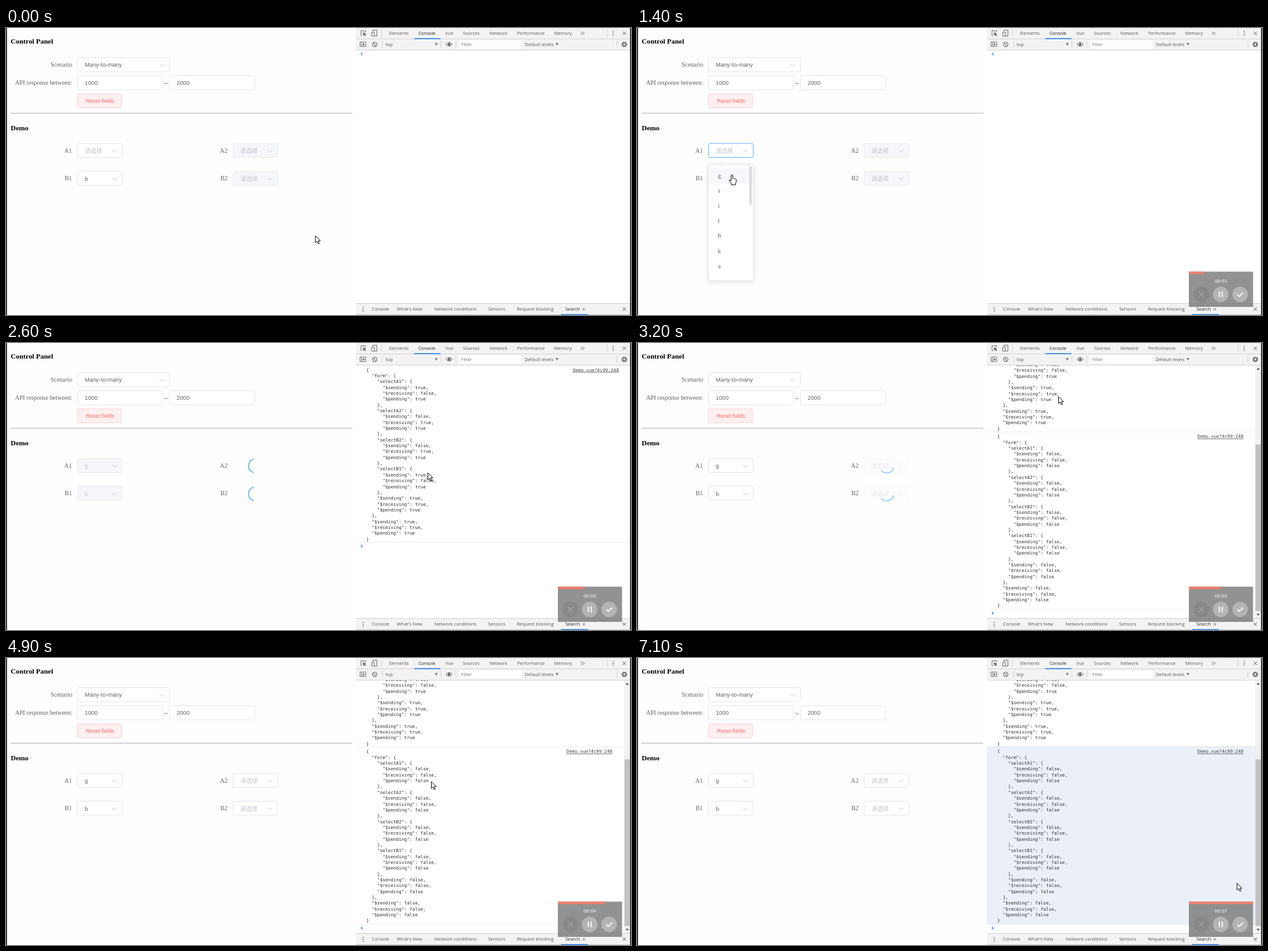
An HTML page that plays this animation: 1000x460 px, repeating every 7.2 s.

```html
<!DOCTYPE html>
<html lang="en">
<head>
<meta charset="utf-8">
<title>Control Panel</title>
<style>
html, body { margin: 0; width: 100%; height: 100%; overflow: hidden; background: #fefefe; }
svg { display: block; width: 1000px; height: 460px; }
text { white-space: pre; }
.serif { font-family: "Liberation Serif", Times, serif; }
.sans { font-family: "Liberation Sans", "Noto Sans CJK SC", Arial, sans-serif; }
.ui { font-family: "Open Sans", "Noto Sans", sans-serif; }
.mono { font-family: "DejaVu Sans Mono", monospace; }
</style>
</head>
<body>
<svg id="stage" viewBox="0 0 1000 460" xmlns="http://www.w3.org/2000/svg"></svg>
<script>
const LOOP = 7200, STEP = 100;
const T = { widget: 100, open: 900, pick: 1500, send: 1600, done: 3100, free: 3300, grab: 5000, clear: 6300 };
const BLUE = '#409eff', CHAR = 4.33, LINE = 9.345, LEFT = 576.5;

const rect = (x, y, w, h, fill, more = '') =>
  `<rect x="${x}" y="${y}" width="${w}" height="${h}" fill="${fill}" ${more}/>`;
const text = (x, y, s, size, cls, fill, more = '') =>
  `<text x="${x}" y="${y}" font-size="${size}" class="${cls}" fill="${fill}" ${more}>${s}</text>`;
const path = (d, stroke, w = 1, more = '') =>
  `<path d="${d}" stroke="${stroke}" stroke-width="${w}" fill="none" ${more}/>`;
const label = (x, y, s) => text(x, y, s, 9.95, 'serif', '#606266', 'text-anchor="end"');
const box = (x, y, w, more = '') =>
  rect(x, y, w, 22.5, '#fff', `rx="2.5" stroke="#dcdfe6" stroke-width=".8" ${more}`);
const value = (x, y, s, more = '') => text(x, y, s, 9.3, 'sans', '#606266', more);
const cross = (x, y, r, c, w = 1) =>
  path(`M${x - r} ${y - r}l${2 * r} ${2 * r}m0 ${-2 * r}l${-2 * r} ${2 * r}`, c, w);
const dots = (x, y) => [-3.2, 0, 3.2].map(d => `<circle cx="${x}" cy="${y + d}" r=".9" fill="#6e6e6e"/>`).join('');
const chevron = (x, y, id = '') =>
  `<g transform="translate(${x} ${y})"><path id="${id}" d="M-3.7 -1.8L0 1.9L3.7 -1.8" fill="none" stroke="#c0c4cc" stroke-width="1"/></g>`;

function field(id, x, y) {
  return label(x - 9, y + 14.8, id) +
    box(x, y, 71.5, `id="${id}box"`) +
    value(x + 11.5, y + 15, '', `id="${id}val"`) +
    chevron(x + 59, y + 12.3, id + 'arr');
}

function spinner(id, y) {
  return `<g id="${id}">${rect(362, y - 13.5, 75, 26, '#fff', 'opacity=".93"')}
    <path class="arc" fill="none" stroke="${BLUE}" stroke-width="1.3" stroke-linecap="round" transform="translate(399.5 ${y})"/></g>`;
}

// console message: [indent, string] per line
function logLines(a) {
  const out = [[0, '{'], [2, '"form": {']];
  const flags = (ind, v) => ['sending', 'receiving', 'pending'].forEach((k, i) =>
    out.push([ind, `"$${k}": ${v[i]}${i < 2 ? ',' : ''}`]));
  const on = [a, a, a], tx = [a, false, a], rx = [false, a, a];
  for (const [name, v] of [['A1', tx], ['A2', rx], ['B2', rx], ['B1', tx]]) {
    out.push([4, `"select${name}": {`]);
    flags(6, v);
    out.push([4, '},']);
  }
  flags(4, on);
  out.push([2, '},']);
  flags(2, on);
  out.push([0, '}']);
  return out;
}
const sentLog = logLines(true), doneLog = logLines(false);
const logText = lines => lines.map(([ind, s], i) =>
  text(LEFT + ind * CHAR, 45.6 + i * LINE, s, 7.2, 'mono', '#303030')).join('');
const link = 'Demo.vue?4c99:248';
const linkText = (x, id) => text(x, 45.6, link, 7.2, 'mono', '#444', `id="${id}" text-anchor="end" text-decoration="underline"`);

const page =
  text(7.5, 25.3, 'Control Panel', 11.4, 'serif', '#000', 'font-weight="bold"') +
  label(106, 62, 'Scenario') + box(114.5, 47.5, 147) + value(126, 62, 'Many-to-many') + chevron(249.5, 59.7) +
  label(106, 91, 'API response between:') + box(114.5, 76.5, 136.5) + value(126, 91, '1000') +
  text(253.3, 91.5, '~', 10, 'serif', '#333') + box(261.5, 76.5, 136.5) + value(273, 91, '2000') +
  rect(114.5, 105.7, 70, 22, '#fef0f0', 'rx="2" stroke="#fbc4c4" stroke-width=".8"') +
  text(127.7, 120, 'Reset fields', 8.7, 'sans', '#f56c6c') +
  rect(7.5, 135.8, 546.5, 1.6, '#c9c9c9') +
  text(7.5, 163.5, 'Demo', 11.4, 'serif', '#000', 'font-weight="bold"') +
  field('A1', 114.5, 185) + field('A2', 363.5, 185) + field('B1', 114.5, 229.5) + field('B2', 363.5, 229.5) +
  spinner('spinA', 197) + spinner('spinB', 241.7);

const menu = `<g id="menu">` +
  rect(114.5, 219.5, 71.5, 185.5, '#fff', 'rx="2.5" stroke="#e4e7ed" stroke-width=".8" style="filter:drop-shadow(0 1px 4px rgba(0,0,0,.14))"') +
  `<path d="M140 219.7l4 -3.6l4 3.6z" fill="#fff" stroke="#ebeef5" stroke-width=".6"/>` +
  rect(115, 225, 70.5, 24, '#f5f7fa', 'id="hover"') +
  [...'gsirhka'].map((c, i) => text(129.5, 240 + i * 24.1, c, 9.9, 'serif', '#606266')).join('') +
  rect(179.7, 221.5, 4, 62, '#d9dadd', 'rx="2"') + `</g>`;

const tab = (x, s, fill = '#5a5a5a', size = 7.25) => text(x, 11.2, s, size, 'ui', fill);
const foot = (x, s, fill = '#5a5a5a') => text(x, 453.4, s, 7.4, 'ui', fill);
const down = (x, y) => `<path d="M${x} ${y}h4.4l-2.2 4z" fill="#6e6e6e"/>`;
const vline = x => rect(x, 20.5, .8, 11, '#ccc');
const tools =
  rect(560, 0, 440, 35.5, '#f3f3f3') + rect(560, 17, 440, .8, '#ccc') + rect(560, 35, 440, .8, '#ccc') +
  path('M575.5 6.5V4.5H568V12H570', '#6e6e6e', 1) +
  `<path d="M571 7l5.3 2.1l-2.2.9l1.9 2l-.9.9l-1.9 -2l-.9 2z" fill="#555"/>` +
  path('M587 6V3.5H593.5V13H589.5M585 7H589.3V13H585Z', '#6e6e6e', 1) + rect(600.5, 3, .8, 11, '#ccc') +
  tab(613, 'Elements') + tab(660, 'Console', '#222') + tab(703, 'Vue') + tab(731, 'Sources') +
  tab(773.5, 'Network') + tab(818, 'Performance') + tab(877, 'Memory') +
  path('M919.8 6l2.4 2.5l-2.4 2.5m3 -5l2.4 2.5l-2.4 2.5', '#6e6e6e', 1) +
  rect(653, 16.4, 42, 1.4, '#1a73e8') + rect(961.5, 3, .8, 11, '#ccc') + dots(971.5, 8.5) + cross(989.3, 8.5, 2.6, '#555') +
  path('M566.5 22.5h9.2v7.2h-9.2zM569 22.5v7.2', '#6e6e6e', .9) + `<path d="M571 24.2l3.4 2l-3.4 2z" fill="#555"/>` +
  `<circle cx="590" cy="26.3" r="3.6" fill="none" stroke="#6e6e6e" stroke-width="1.1"/>` + path('M587.5 23.8l5 5', '#6e6e6e', 1.1) +
  vline(602) + text(607.5, 29, 'top', 7.3, 'ui', '#5a5a5a') + down(686.3, 24.3) + vline(695.5) +
  path('M704 26.2Q709 20.6 714 26.2Q709 31.8 704 26.2Z', '#555', 1) + `<circle cx="709" cy="26.2" r="1.9" fill="#555"/>` + vline(719.5) +
  rect(725.5, 20, 99.5, 12.5, '#fff') + text(728.5, 29, 'Filter', 7.3, 'ui', '#757575') +
  text(830, 28.8, 'Default levels', 7.35, 'ui', '#5a5a5a') + down(879.3, 24) + vline(977) +
  `<circle cx="989.3" cy="26.3" r="2.7" fill="none" stroke="#6e6e6e" stroke-width="1.9"/>` +
  `<circle cx="989.3" cy="26.3" r="4" fill="none" stroke="#6e6e6e" stroke-width="1.3" stroke-dasharray="1.57"/>`;

const drawer =
  rect(560, 441, 440, 19, '#f3f3f3') + rect(560, 441, 440, .8, '#ccc') + rect(560, 459, 440, 1, '#ccc') +
  dots(571.5, 451) + foot(585.5, 'Console') + foot(625.5, "What's New") + foot(685.5, 'Network conditions') +
  foot(771.5, 'Sensors') + foot(817.5, 'Request blocking') + foot(895, 'Search', '#222') +
  cross(924.5, 450.7, 1.8, '#555', .9) + rect(888, 458.7, 43, 1.3, '#1a73e8') + cross(989.3, 450.7, 2.6, '#555');

const bar = `<g id="bar">` + rect(989, 36, 9.5, 405, '#f1f1f1') + rect(989.5, 162.5, 8.5, 267, '#c1c1c1') +
  `<path d="M991.3 42.8l2.6 -3l2.6 3z" fill="#505050"/><path d="M991.3 434l2.6 3l2.6 -3z" fill="#505050"/></g>`;

const consolePane = `<clipPath id="pane"><rect x="560" y="35.8" width="440" height="405.2"/></clipPath>
  <g clip-path="url(#pane)">${rect(560, 35.8, 440, 406, '#fff')}
  <g id="sent">${logText(sentLog)}${linkText(980.5, 'sentLink')}${rect(561, 319, 438, .8, '#ececec')}</g>
  <g id="done" transform="translate(0 106.8)">${rect(561, 35.3, 428, 284.6, '#ebf0f8', 'id="focus" stroke="#d3def0" stroke-width=".8"')}
  <g id="marks"></g>${logText(doneLog)}${linkText(970.3, 'doneLink')}${rect(561, 319.6, 428, .8, '#ececec')}</g>
  <g id="prompt">${path('M567.8 -2l2.4 2l-2.4 2', '#367cf1', 1.1)}</g>${bar}</g>`;

const knob = (x, fill) => `<circle cx="${x}" cy="427" r="12.4" fill="${fill}"/>`;
const widget = `<g id="widget">` + rect(883, 390.5, 102.7, 56.5, '#777', 'opacity=".8"') +
  rect(883, 390.5, 0, 4, '#f0806f', 'id="progress"') +
  text(934.2, 408, '00:00', 8, 'sans', '#fff', 'id="clock" text-anchor="middle"') +
  knob(903, '#888') + cross(903, 427, 4, '#a6a6a6', 1.1) + knob(934, '#b4b4b4') +
  path('M931.8 422.5v9m4.6 0v-9', '#fff', 1.8) + knob(965, '#b4b4b4') + path('M960.3 427l3.3 3.3l6.2 -6.4', '#fff', 1.7) + `</g>`;

const pointers = `<path id="arrow" d="M0 0V11L2.6 8.7L4.5 13L6.4 12.1L4.5 8.1H8Z" fill="#fff" stroke="#111" stroke-width="1" stroke-linejoin="round"/>
  <path id="hand" d="M-1.3 0Q0 -1.4 1.2 0V5Q2.6 4.2 3.4 5.4Q4.8 4.8 5.3 6Q6.7 5.7 6.8 7.2V10.5L5.6 13V15.3H-1V13.2L-4.2 9Q-4.6 7 -2.8 7.6L-1.3 9Z" fill="#fff" stroke="#111" stroke-width="1" stroke-linejoin="round"/>`;

document.getElementById('stage').innerHTML =
  rect(0, 0, 1000, 460, '#fefefe') + page + menu + rect(560, 0, .8, 460, '#ccc') + consolePane + tools + drawer +
  rect(0, 0, 1.5, 460, '#111') + rect(998.6, 0, 1.4, 460, '#111') + widget + pointers;

const el = id => document.getElementById(id);
const show = (id, on) => el(id).setAttribute('display', on ? 'inline' : 'none');
const put = (id, props) => { for (const k in props) el(id).setAttribute(k, props[k]); };
const ramp = (t, from, len) => Math.min(1, Math.max(0, (t - from) / len));
const smooth = u => u * u * (3 - 2 * u);

// time, x, y
const route = [[0, 495, 333], [200, 495, 333], [800, 152, 192], [1000, 152, 193], [1400, 152, 236],
  [1600, 152, 236], [2300, 675, 208], [2700, 675, 208], [3200, 674.5, 86], [4100, 674.5, 86],
  [4400, 664, 150], [4800, 685, 200], [5000, 676, 196], [5200, 676, 196], [5700, 658.5, 169],
  [6300, 658.5, 169], [7100, 960, 361]];

function cursorAt(t) {
  const i = route.findIndex(p => p[0] > t);
  if (i < 0) return route[route.length - 1].slice(1);
  const [a, b] = [route[i - 1], route[i]];
  const u = smooth((t - a[0]) / (b[0] - a[0]));
  return [a[1] + (b[1] - a[1]) * u, a[2] + (b[2] - a[2]) * u];
}

function setField(id, s, off, focus) {
  const empty = s === '请选择';
  put(id + 'box', { fill: off ? '#f5f7fa' : '#fff', stroke: focus ? BLUE : off ? '#e4e7ed' : '#dcdfe6' });
  put(id + 'val', { fill: empty || off ? '#c0c4cc' : '#606266' });
  if (el(id + 'val').textContent !== s) el(id + 'val').textContent = s;
}

function arc(t) {
  const rad = d => d * Math.PI / 180, r = 11.3;
  const len = 140 * ramp(t, T.send, 700) - 15 * ramp(t, 2600, 600);
  const from = 110 + .443 * (t - 2600);
  const at = d => `${r * Math.cos(rad(d))} ${r * Math.sin(rad(d))}`;
  return `M${at(from)}A${r} ${r} 0 0 1 ${at(from + len)}`;
}

// text selected upwards from the end of the "pending" row
function marks(t, x, y) {
  if (t < T.grab || t >= T.clear) return '';
  const last = 5, top = Math.min(last, Math.max(2, Math.round((y - 150) / LINE)));
  let out = '';
  for (let r = top; r <= last; r++) {
    const [ind, s] = doneLog[r];
    const end = LEFT + (ind + s.length) * CHAR;
    const x0 = r === top ? Math.min(x, end) : LEFT;
    const x1 = r === last ? end : end + CHAR;
    out += rect(x0, 43.2 + (r - .5) * LINE, x1 - x0, LINE + .1, '#b0d5fd');
  }
  return out;
}

function render(t) {
  const [x, y] = cursorAt(t);
  const hand = t >= 700 && t <= T.send;
  show('hand', hand);
  show('arrow', !hand);
  put(hand ? 'hand' : 'arrow', { transform: `translate(${x} ${y})` });

  const busy = t >= T.send && t < T.done, off = t < T.free;
  const opened = t >= T.open && t < T.pick;
  setField('A1', t >= T.pick ? 'g' : '请选择', busy, opened);
  setField('B1', 'b', busy);
  setField('A2', '请选择', off);
  setField('B2', '请选择', off);
  const turn = ramp(t, T.open, 300) - ramp(t, T.pick, 300);
  put('A1arr', { transform: `rotate(${180 * turn})` });

  const m = smooth(turn);
  show('menu', m > 0);
  put('menu', { opacity: m, transform: `translate(0 ${219.5 * (1 - m)}) scale(1 ${m})` });
  show('hover', t >= 1200);

  const veil = ramp(t, T.send - 100, 300) - ramp(t, T.done, 300);
  for (const id of ['spinA', 'spinB']) {
    show(id, t >= T.send && veil > 0);
    put(id, { opacity: veil });
    el(id).querySelector('.arc').setAttribute('d', arc(t));
  }

  const sent = t >= T.send, done = t >= T.done;
  show('sent', sent);
  show('done', done);
  show('bar', done);
  put('sent', { transform: `translate(0 ${done ? -177 : 0})` });
  put('prompt', { transform: `translate(0 ${done ? 433 : sent ? 325.5 : 41.7})` });
  show('focus', t >= T.grab);
  el('marks').innerHTML = marks(t, x, y);

  const s = t / 1000;
  show('widget', t >= T.widget);
  put('progress', { width: Math.min(102.7, 1.5 + 16 * s - .22 * s * s) });
  el('clock').textContent = '00:0' + Math.floor(s);
}

const start = performance.now();
function frame() {
  const t = (performance.now() - start) % LOOP;
  render(Math.floor(t / STEP) * STEP);
  requestAnimationFrame(frame);
}
render(0);
requestAnimationFrame(frame);
</script>
</body>
</html>
```
